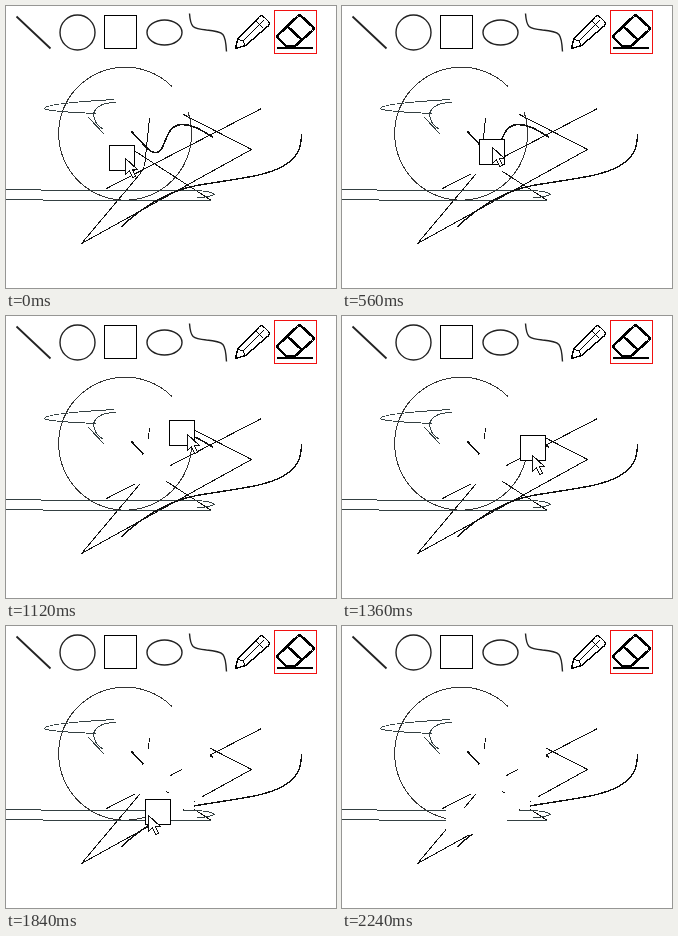
Animation of 330 by 282 pixels, one loop 2.32 s. Source, as an HTML page:

```html
<!DOCTYPE html>
<html lang="en">
<head>
<meta charset="utf-8">
<title>Eraser</title>
<style>
html, body { margin: 0; width: 100%; height: 100%; overflow: hidden; background: #fff; }
svg { display: block; }
</style>
</head>
<body>
<svg width="330" height="282" viewBox="0 0 330 282" fill="none" stroke="#111" shape-rendering="crispEdges">
<g transform="translate(.5 .5)">
  <!-- drawing -->
  <path stroke="#333" d="M165.500 80A66.500 66.500 0 1 0 181.500 105.500"/>
  <path d="M177 108L245 143L75 237L133 168L138 160L143 112M255 102L100 182M129 145L205 194"/>
  <g stroke="#344042">
    <path d="M0 183.400L190 184Q206 185 208 188Q202 191 190 191M0 193.400L205 194"/>
    <path d="M108 93Q38 97 38 102Q40 105 90 107M109 96Q91 96 87 107Q87 117 97 123M82 111L98 128"/>
  </g>
  <path stroke-width="1.6" d="M125 125L138 139C145 147 151 149 156 141C161 128 164 118 176 118C188 118 198 126 207 131"/>
  <path stroke-width="1.4" d="M115 220C137 200 160 185 190 179C238 171 257 170 276 160C290 152 295 143 295 127"/>
  <path id="rubbed" fill="#fff" stroke="none"/>

  <!-- toolbar -->
  <g stroke="#222" stroke-width="1.4" shape-rendering="auto">
    <path stroke-width="1.8" d="M10 10L44 42"/>
    <circle cx="71" cy="26" r="17.500"/>
    <ellipse cx="158" cy="26" rx="17.500" ry="12.500"/>
    <path d="M183 7C184 21 186 22 200 23.500C218 25 219 27 220 45"/>
  </g>
  <rect x="98" y="9" width="32" height="33" stroke="#000"/>
  <g stroke="#000" stroke-width="1.400">
    <path d="M229 42L231 33L253 10Q255 8 258 11L262 15Q264 18 261 20L239 39Z"/>
    <path stroke-width="1" d="M231 33L236 34L239 39M236 35L257 14M249 14L257 22"/>
  </g>
  <rect x="268" y="4" width="42" height="43" stroke="#f01010"/>
  <g stroke="#000" stroke-width="2.600">
    <path d="M272 28L291 10Q293 8 295 10L306 20Q308 22 306 24L288 40H280L272 32Q270 30 272 28ZM281 20L295 33"/>
    <path d="M270 41.500H306"/>
  </g>

  <rect id="box" width="25" height="25" stroke="#000"/>
  <path id="cursor" fill="#fff" d="M0 0V16L4 12L7 19L10 18L7 11H12Z"/>
</g>
</svg>
<script>
const STEP = 80, STEPS = 29, PAUSE = 6, SPAN = 4;
// key places of the eraser's top left corner, SPAN steps apart
const keys = [[103,139], [131,142], [138,128], [148,104], [176,112], [170,149], [128,178], [98,183]];
const [rubbed, box, cursor] = ["rubbed", "box", "cursor"].map(id => document.getElementById(id));
const place = (el, [x, y]) => el.setAttribute("transform", `translate(${x} ${y})`);
const keyAt = k => keys[Math.max(0, Math.min(keys.length - 1, k))];

// smooth (Catmull-Rom) curve through the keys
function along(step) {
  const k = Math.floor(step / SPAN), t = step / SPAN - k;
  const [a, b, c, d] = [-1, 0, 1, 2].map(n => keyAt(k + n));
  return [0, 1].map(n => Math.round(b[n] + t / 2 * (c[n] - a[n]
    + t * (2 * a[n] - 5 * b[n] + 4 * c[n] - d[n] + t * (3 * (b[n] - c[n]) + d[n] - a[n])))));
}

function draw(i) {
  const end = i === STEPS - 1;
  const step = i === PAUSE ? i - 1 : end ? i - 1 : i;
  let stamps = "";
  for (let s = 0; s <= step; s++) stamps += `M${along(s)}h25v25h-25z`;
  rubbed.setAttribute("d", stamps);
  place(box, along(step));
  // the pointer runs slightly ahead of the box
  const [x, y] = along(step + 0.75);
  place(cursor, [x + 12, y + 12]);
  box.style.display = cursor.style.display = end ? "none" : "";
}

let shown = -1;
const start = performance.now();
function tick(now) {
  const i = Math.floor(Math.max(0, now - start) / STEP) % STEPS;
  if (i !== shown) draw(shown = i);
  requestAnimationFrame(tick);
}
tick(start);
</script>
</body>
</html>
```
